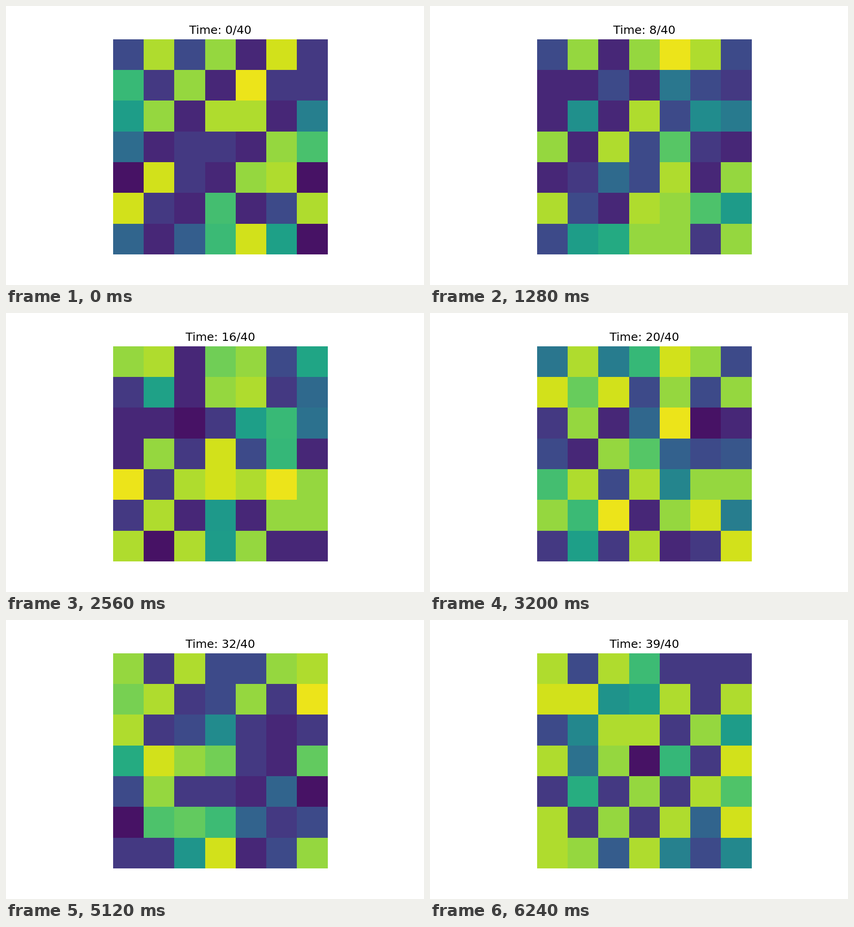
Write a matplotlib script that moves like this. It is 917x611 px and loops after 6400 ms.

```python
import numpy as np
import matplotlib.pyplot as plt
from matplotlib.animation import FuncAnimation

STEPS = 40
SIZE = 7
DPI = 917 / 6
LOW = (0.11, 0.165, 0.225)
HIGH = (0.84, 0.88, 0.93)


def band_states(rng):
    """High or low for each anti-diagonal: high drops, low usually rises."""
    states = [rng.random() < 0.6]
    while len(states) < 2 * SIZE - 1:
        rise = 0.08 if states[-1] else 0.8
        states.append(rng.random() < rise)
    return np.array(states)


def grid_at(step):
    """Diagonal bands of bright and dark cells with scattered strays."""
    rng = np.random.default_rng(100 + step)
    shape = (SIZE, SIZE)
    row, col = np.indices(shape)
    diagonal = row + col

    high = band_states(rng)[diagonal]
    high = high ^ (rng.random(shape) < 0.12)

    # Cells of a band share one level unless they stray.
    level = rng.integers(0, 3, 2 * SIZE - 1)[diagonal]
    level = np.where(rng.random(shape) < 0.35, rng.integers(0, 3, shape), level)
    grid = np.where(high, np.take(HIGH, level), np.take(LOW, level))

    mid = rng.uniform(0.25, 0.8, shape)
    grid = np.where(rng.random(shape) < 0.2, mid, grid)
    edge = rng.choice([0.05, 0.97], shape)
    return np.where(rng.random(shape) < 0.06, edge, grid)


fig, ax = plt.subplots(figsize=(6 + 1e-8, 611 / DPI + 1e-8), dpi=DPI)
ax.axis("off")
image = ax.imshow(grid_at(0), cmap="viridis", vmin=0, vmax=1,
                  interpolation="nearest")
title = ax.set_title("", fontsize=12, fontfamily="DejaVu Sans")


def draw(step):
    image.set_data(grid_at(step))
    title.set_text(f"Time: {step}/{STEPS}")
    return image, title


anim = FuncAnimation(fig, draw, frames=STEPS, interval=160, repeat=True)
plt.show()
```
